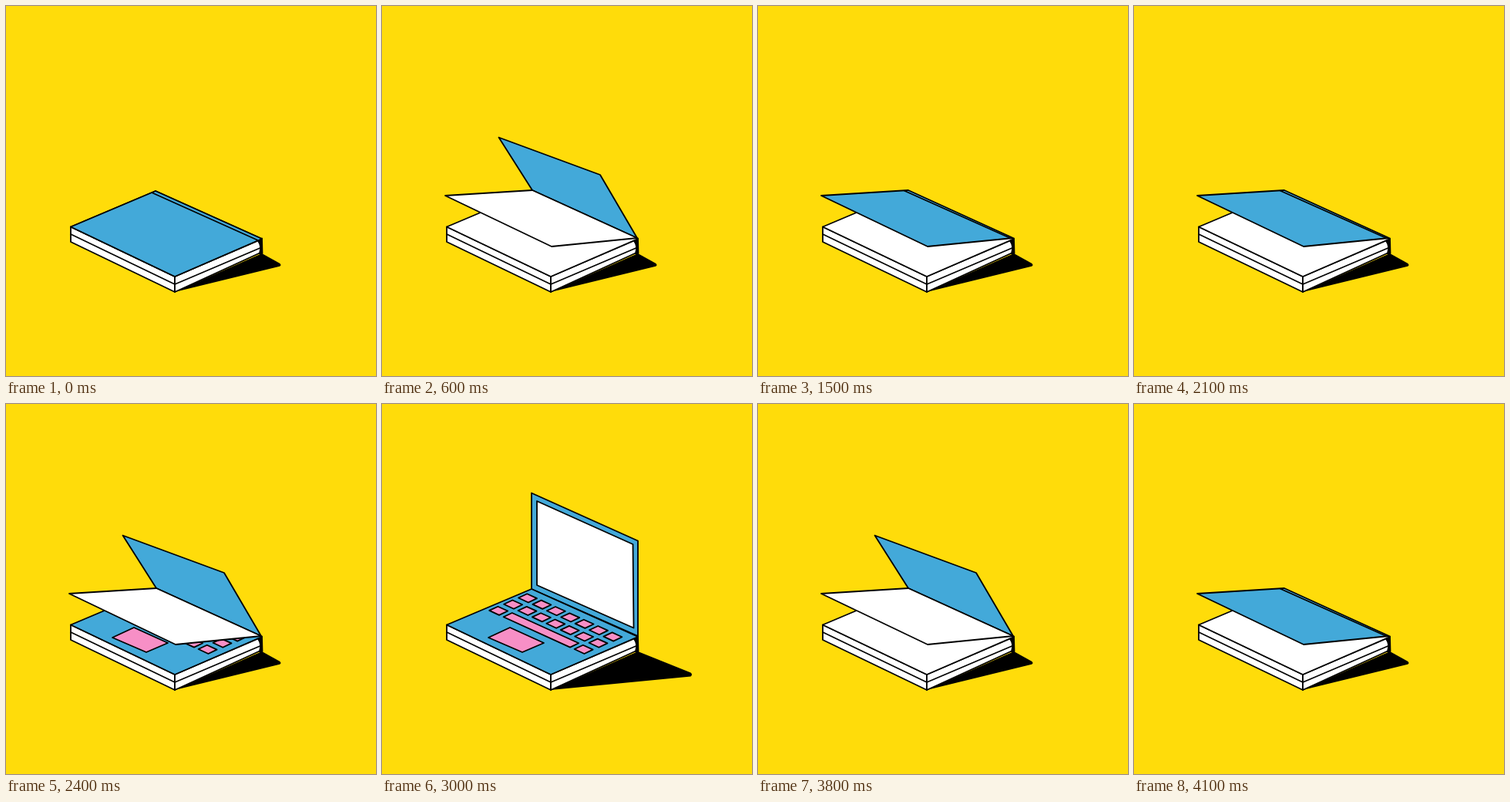
Recreate the animation shown at these times as an HTML page. Size 480 by 480 pixels, loop 4.4 s.

```html
<!DOCTYPE html>
<html lang="en">
<head>
<meta charset="utf-8">
<title>Book and laptop</title>
<style>
html, body { margin: 0; width: 100%; height: 100%; overflow: hidden; background: #ffdc0a; }
svg { display: block; width: 100vw; height: 100vh; }
</style>
</head>
<body>
<svg id="stage" viewBox="0 0 480 480" stroke="#000" stroke-width="1.8" stroke-linejoin="round" stroke-linecap="round"></svg>
<script>
const BLUE = '#43a9d9', PINK = '#f78fc6', WHITE = '#fff', BLACK = '#000';
const stage = document.getElementById('stage');

const poly = (points, fill) => `<polygon points="${points}" fill="${fill}"/>`;
const line = points => `<polyline points="${points}" fill="none"/>`;

// Leaf outlines, all hinged on the same back edge
const LEAF = {
  flat: '194,240 84,286.5 219,351 332,302',
  low: '195,239 82,246 220,312 331,301',
  mid: '195,239 151.5,170.5 283,219 331,301',
  up: '194,240 194,115.5 332,177.5 332,301'
};
const SCREEN = {
  mid: '159,177 281,222 327,298 197.5,238',
  up: '201,126 325.5,182 326.5,290.5 201,235'
};

function shadow(long) {
  const end = long
    ? 'L400.5 348.6Q403.5 351 400.5 353.5'
    : 'L355 333.8Q358 336.5 355 337.8';
  return `<path d="M219 371L332 321${end}Z" fill="${BLACK}" stroke="none"/>`;
}

function key(col, row, span = 0) {
  const x = 189 + 18.4 * col - 18.9 * row;
  const y = 251.8 + 8.35 * col + 8.2 * row;
  const dx = 18.4 * span, dy = 8.35 * span;
  return poly([x - 12, y - .3, x - .8, y - 5.5, x + 12 + dx, y + .3 + dy, x + .8 + dx, y + 5.7 + dy], PINK);
}

function keyboard() {
  let keys = '';
  for (let row = 0; row < 2; row++)
    for (let col = 0; col < 7; col++) keys += key(col, row);
  return keys + key(0, 2) + key(1, 2, 4) + key(6, 2) +
    poly('138,303 166,290 210,310 182,322', PINK);
}

function base(laptop) {
  return poly('327,304 332,301.5 332.5,321 328,321', BLACK) +
    poly('84,286.5 84,306 219,371 219,351', WHITE) +
    `<path d="M219 351L327 304.5Q332 312 329 320.5L219 371Z" fill="${WHITE}"/>` +
    line('84,296 219,361 329.5,314') +
    poly(LEAF.flat, laptop ? BLUE : WHITE) +
    (laptop ? keyboard() : '');
}

function draw({ cover, pages = [], laptop = false, screen = false }) {
  const raised = cover === 'mid' || cover === 'up';
  const lid = poly(LEAF[cover], BLUE) + (screen ? poly(SCREEN[cover], WHITE) : '');
  const leaves = pages.map(p => [p, poly(LEAF[p], WHITE)]);
  const pick = pose => leaves.filter(l => l[0] === pose).map(l => l[1]).join('');
  let out = shadow(cover === 'up');
  if (raised) out += lid + pick('mid');
  out += base(laptop) + pick('low');
  if (!raised) {
    out += lid + (cover === 'flat' ? line('189.5,242.3 327.5,304.3') : line('190,239.8 328,301.5'));
  }
  stage.innerHTML = out;
}

const closed = { cover: 'flat' };
const ajar = { cover: 'low' };
const half = { cover: 'mid', pages: ['low'] };
const book = { cover: 'up', pages: ['mid', 'low'] };
const reveal = { cover: 'mid', pages: ['low'], laptop: true };
const tilted = { cover: 'mid', laptop: true, screen: true };
const open = { cover: 'up', laptop: true, screen: true };

const LOOP = 4400;
const poses = [
  [0, closed], [300, ajar], [600, half], [900, book], [1200, half],
  [1500, ajar], [1800, closed], [2100, ajar], [2400, reveal], [2700, tilted],
  [3000, open], [3500, tilted], [3800, half], [4100, ajar]
];

let start, shown;
function tick(now) {
  start ??= now;
  const t = (now - start) % LOOP;
  const pose = poses.findLast(p => p[0] <= t)[1];
  if (pose !== shown) draw(shown = pose);
  requestAnimationFrame(tick);
}
draw(shown = closed);
requestAnimationFrame(tick);
</script>
</body>
</html>
```
